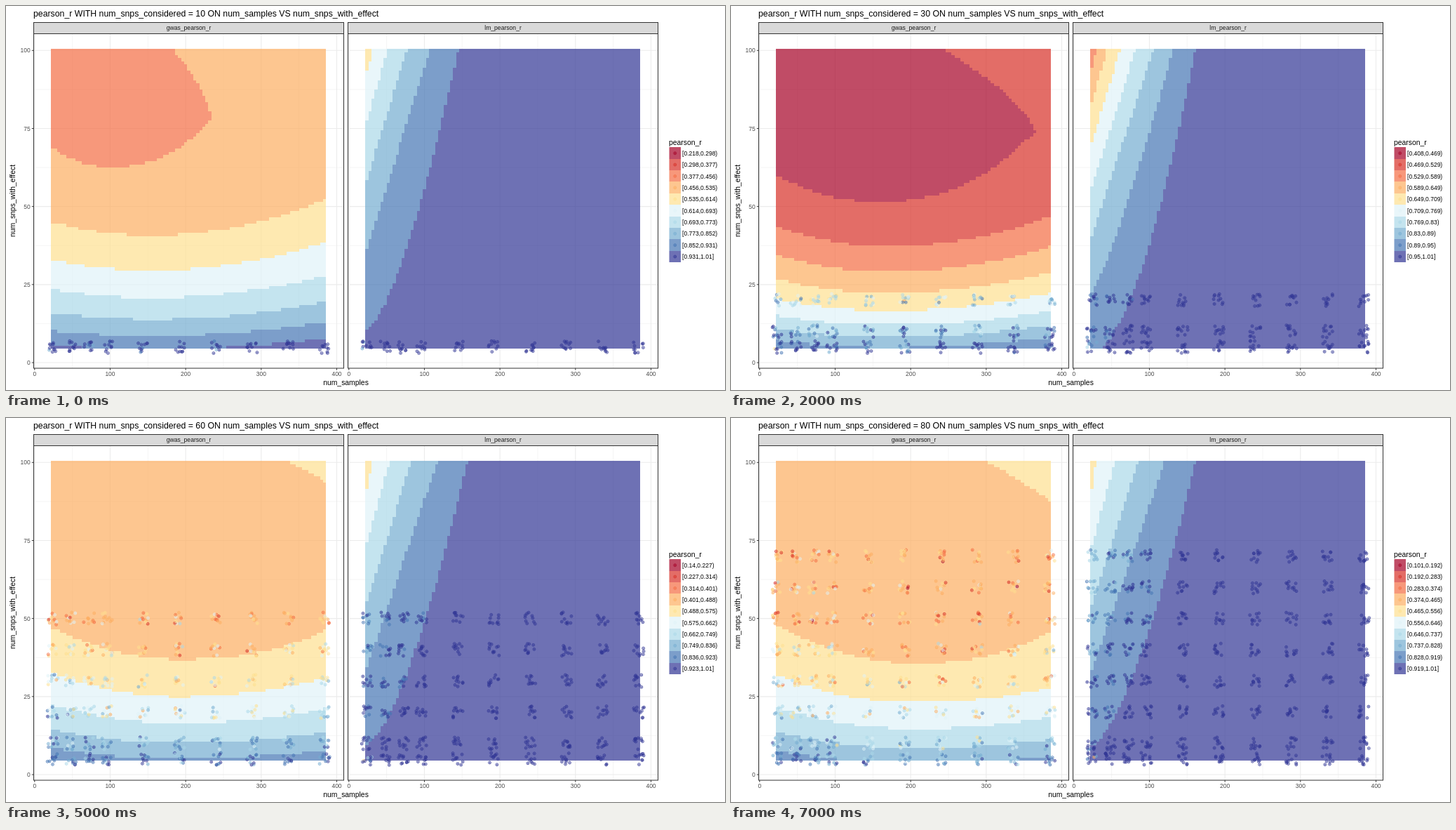
These frames come from a looping animation (1025 by 547 pixels, 8 s). An HTML page with a canvas:

```html
<!DOCTYPE html>
<html lang="en">
<head>
<meta charset="utf-8">
<title>pearson_r by sample count</title>
<style>
html, body { margin: 0; width: 100%; height: 100%; overflow: hidden; background: #fff; }
canvas { display: block; width: 1025px; height: 547px; }
</style>
</head>
<body>
<canvas id="stage" width="1025" height="547"></canvas>
<script>
const ctx = document.getElementById('stage').getContext('2d');
const FONT = '"Liberation Sans", Arial, sans-serif';
const COLORS = ['#a50026', '#d73027', '#f46d43', '#fdae61', '#fee090',
                '#e0f3f8', '#abd9e9', '#74add1', '#4575b4', '#313695'];
const SAMPLES = [24, 48, 72, 96, 144, 192, 240, 288, 336, 384];
// Smallest pearson_r for 10, 20, ... considered SNPs.
const LOWEST = [0.21845, 0.00644, 0.40848, 0.334, 0.0586, 0.14, 0.117, 0.1011];
const HIGHEST = 1.01, VALLEY = 0.435;
const STEP_MS = 1000, LEFT = 39.5, TOP = 39.5, BOTTOM = 516;
const COLS = 91, ROWS = 96;

const yPx = y => 508 - y * 4.447;
const clamp = (v, lo, hi) => Math.max(lo, Math.min(hi, v));

function random(seed) {
  return () => {
    seed = (seed + 0x6d2b79f5) | 0;
    let t = Math.imul(seed ^ (seed >>> 15), seed | 1);
    t ^= t + Math.imul(t ^ (t >>> 7), t | 61);
    return ((t ^ (t >>> 14)) >>> 0) / 4294967296;
  };
}

// Left panel: bowl-shaped contours that crowd together towards the bottom.
function gwasField(n, breaks) {
  const pivot = 10.7, centre = 148 + 0.7 * n;
  const lowest = v => 270 * Math.exp(-3.1 * v) * (1 - 0.0043 * (n - 10)) - pivot;
  const raise = (low, ratio) => (low + pivot) * ratio - pivot;
  const leftEnd = low => raise(low, 1.06 + 0.0026 * n);
  const rightEnd = low => raise(low, 1.24 - 0.0012 * n);

  const first = breaks.findIndex(v => v > VALLEY);
  const bands = breaks.slice(first + 1, 10).map(lowest);
  const isBelow = (low, x, y) => {
    const t = x < centre ? (centre - x) / (centre - 22) : (x - centre) / (386 - centre);
    const end = x < centre ? leftEnd(low) : rightEnd(low);
    return y < low + (end - low) * t * t;
  };

  // The first contour above the valley floor bends back to the top edge at a tip.
  const excess = breaks[first] - VALLEY;
  const tipX = 45 + 38 * Math.sqrt(n) + 3300 * excess, tipY = 80 - 0.2 * n;
  const topX = 115 + 1.35 * n + 2600 * excess;
  const floor = lowest(breaks[first]) + 1.3 + (500 - tipX) * 0.024;
  const floorX = Math.min(centre, tipX * 0.42);
  const inValley = (x, y) => {
    if (x > tipX) return false;
    if (y > tipY) return x < tipX - (tipX - topX) * ((y - tipY) / (100.5 - tipY)) ** 1.45;
    return y > (x < floorX
      ? floor + (leftEnd(floor) - floor) * ((floorX - x) / (floorX - 22)) ** 2
      : floor + (tipY - floor) * ((x - floorX) / (tipX - floorX)) ** 2.4);
  };

  return (x, y) => inValley(x, y) ? first - 1
    : first + bands.filter(low => isBelow(low, x, y)).length;
}

// Right panel: contours fan out from the left edge up to the top edge.
function lmField(n, breaks) {
  const curves = breaks.slice(1, 10).map(v => {
    const gap = 1 - v, d = gap * (1 + (30 - n) * 0.0028);
    const startY = -13.7 + 344 * d - 208 * d * d;
    const topX = 187.8 - 556 * d + 417 * d * d + (n - 30) * (0.28 - 0.95 * gap);
    return { startY, topX, power: Math.min(1, 0.52 + 0.014 * startY) };
  });
  const isLeftOf = ({ startY, topX, power }, x, y) => y > startY &&
    x < 22 + (topX - 22) * ((y - startY) / (100.5 - startY)) ** power;
  return (x, y) => 9 - curves.filter(c => isLeftOf(c, x, y)).length;
}

function line(x1, y1, x2, y2, color, width) {
  ctx.strokeStyle = color;
  ctx.lineWidth = width;
  ctx.beginPath();
  ctx.moveTo(x1, y1);
  ctx.lineTo(x2, y2);
  ctx.stroke();
}

function text(str, x, y, size, color = '#000', align = 'left') {
  ctx.font = `${size}px ${FONT}`;
  ctx.fillStyle = color;
  ctx.textAlign = align;
  ctx.fillText(str, x, y);
}

function marker(x, y, color) {
  ctx.strokeStyle = ctx.fillStyle = color;
  ctx.lineWidth = 0.8;
  ctx.beginPath();
  ctx.arc(x, y, 1.95, 0, 7);
  ctx.stroke();
  ctx.beginPath();
  ctx.arc(x, y, 0.85, 0, 7);
  ctx.fill();
}

function drawTiles(field, xPx) {
  const tiles = document.createElement('canvas');
  tiles.width = COLS;
  tiles.height = ROWS;
  const pen = tiles.getContext('2d');
  for (let i = 0; i < COLS; i++) for (let j = 0; j < ROWS; j++) {
    pen.fillStyle = COLORS[field(24 + 4 * i, 100 - j)];
    pen.fillRect(i, j, 1, 1);
  }
  ctx.globalAlpha = 0.7;
  ctx.imageSmoothingEnabled = false;
  ctx.drawImage(tiles, xPx(22), yPx(100.5), xPx(386) - xPx(22), yPx(4.5) - yPx(100.5));
  ctx.globalAlpha = 1;
}

function drawPoints(n, field, xPx, isLm) {
  const rnd = random(n * 7 + (isLm ? 3 : 1));
  const noise = () => (rnd() + rnd() + rnd() - 1.5) * 2;
  const bias = isLm ? 1 : clamp(3 - 0.045 * n, 0.1, 1.8);
  const rows = [5];
  for (let v = 10; v < n; v += 10) rows.push(v);
  for (const row of rows) for (const s of SAMPLES) for (let i = 0; i < 10; i++) {
    const x = s + (rnd() - 0.5) * 14, y = row + (rnd() - 0.5) * 4;
    const base = field(s, row);
    let level = isLm && base === 9 ? 9 : base + bias + noise() * (isLm ? 0.6 : 1.1);
    if (s === 24 && row === 5 && rnd() < 0.25) level -= 5 * rnd() + 1;
    marker(xPx(x), yPx(y), COLORS[clamp(Math.round(level), 0, 9)]);
  }
}

function drawPanel(n, left, width, name, field, isLm) {
  const xPx = x => left + 1.3 + x * width / 410.5;
  const grid = (offset, color, w) => {
    for (let x = offset * 50; x <= 400; x += 100) line(xPx(x), TOP, xPx(x), BOTTOM, color, w);
    for (let y = offset * 12.5; y <= 100; y += 25) line(left, yPx(y), left + width, yPx(y), color, w);
  };
  grid(1, '#efefef', 0.6);
  grid(0, '#ebebeb', 1.1);
  drawTiles(field, xPx);
  drawPoints(n, field, xPx, isLm);

  ctx.fillStyle = '#d9d9d9';
  ctx.fillRect(left, 23, width, TOP - 23);
  ctx.strokeStyle = '#333';
  ctx.lineWidth = 1;
  ctx.strokeRect(left, 23.5, width, TOP - 23.5);
  ctx.strokeRect(left, TOP, width, BOTTOM - TOP);
  text(name, left + width / 2, 34, 8.6, '#1a1a1a', 'center');
  for (let x = 0; x <= 400; x += 100) {
    line(xPx(x), BOTTOM, xPx(x), BOTTOM + 2.7, '#333', 1);
    text(x, xPx(x), 527.3, 8.5, '#4d4d4d', 'center');
  }
}

function drawLegend(x, labels) {
  text('pearson_r', x - 0.5, 197.5, 10.4);
  COLORS.forEach((color, i) => {
    const y = 201.3 + i * 16.37;
    ctx.globalAlpha = 0.7;
    ctx.fillStyle = color;
    ctx.fillRect(x, Math.round(y), 16.5, Math.round(y + 16.37) - Math.round(y));
    ctx.globalAlpha = 1;
    marker(x + 8.2, y + 8.4, color);
    text(labels[i], x + 18.6, y + 11.5, 8.5);
  });
}

function drawScene(index) {
  const n = 10 * (index + 1), lowest = LOWEST[index];
  const breaks = Array.from({ length: 11 }, (_, i) => lowest + (HIGHEST - lowest) * i / 10);
  const short = breaks.map(v => Number(v.toPrecision(3)));
  const labels = COLORS.map((_, i) => `[${short[i]},${short[i + 1]}${i < 9 ? ')' : ']'}`);
  // Longer legend labels leave less room for the panels.
  const inset = 4.6 * (Math.max(...labels.map(s => s.length)) - 13);
  const width = 442 - inset / 2;

  ctx.fillStyle = '#fff';
  ctx.fillRect(0, 0, 1025, 547);
  text(`pearson_r WITH num_snps_considered = ${n} ON num_samples VS num_snps_with_effect`, 39, 14.5, 12.3);
  drawPanel(n, LEFT, width, 'gwas_pearson_r', gwasField(n, breaks), false);
  drawPanel(n, LEFT + width + 6, width, 'lm_pearson_r', lmField(n, breaks), true);
  for (let y = 0; y <= 100; y += 25) {
    line(LEFT - 2.7, yPx(y), LEFT, yPx(y), '#333', 1);
    text(y, 34.7, yPx(y) + 3.1, 8.5, '#4d4d4d', 'right');
  }
  text('num_samples', 484.5 - inset / 2, 539.6, 10.4, '#000', 'center');
  ctx.save();
  ctx.translate(13, 277.5);
  ctx.rotate(-Math.PI / 2);
  text('num_snps_with_effect', 0, 0, 10.4, '#000', 'center');
  ctx.restore();
  drawLegend(945.5 - inset, labels);
}

let shown = -1;
const startTime = performance.now();
function tick() {
  const index = Math.floor((performance.now() - startTime) / STEP_MS) % LOWEST.length;
  if (index !== shown) drawScene(shown = index);
  requestAnimationFrame(tick);
}
tick();
</script>
</body>
</html>
```
